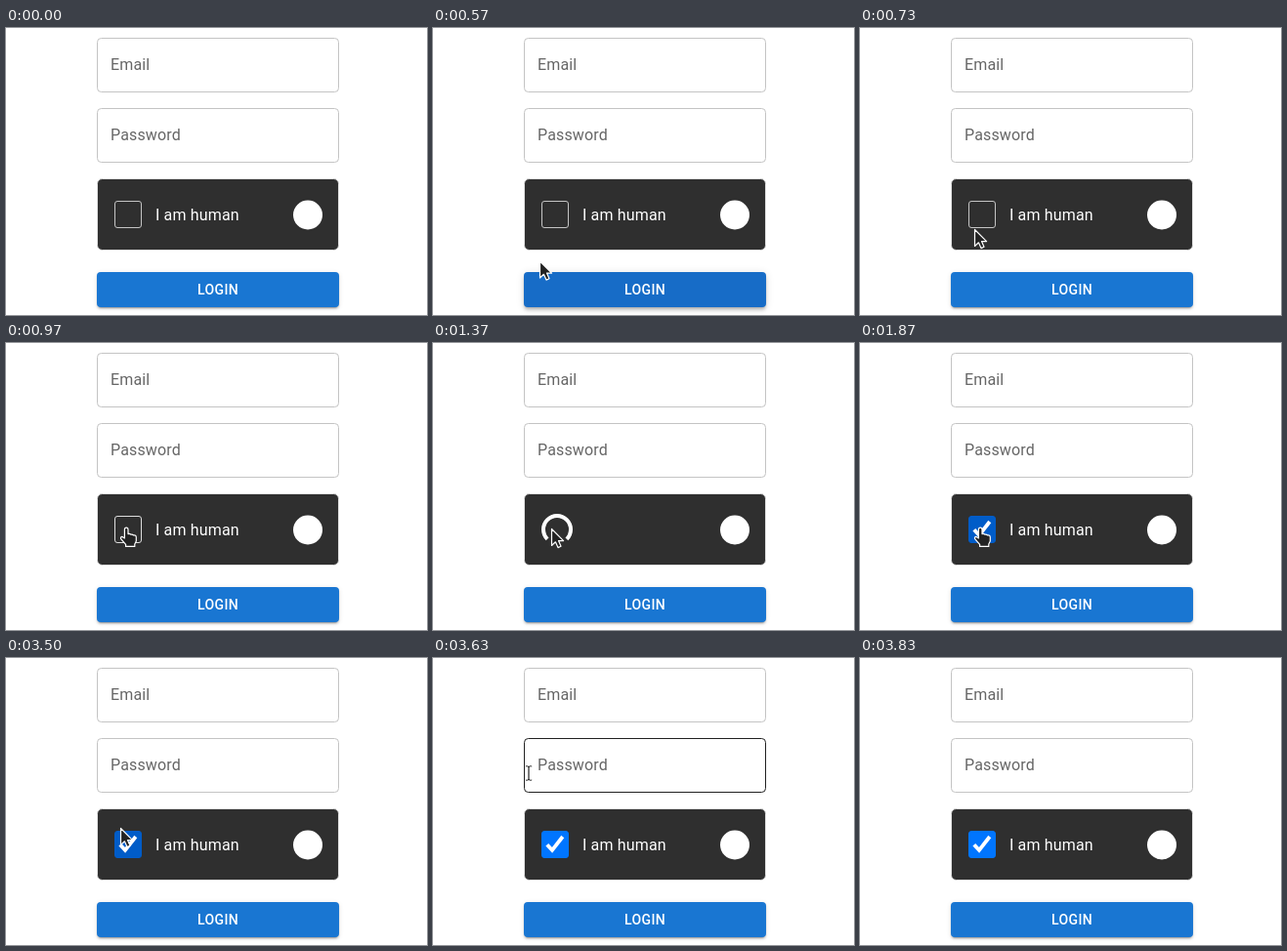
An HTML page that plays this animation: 431x294 px, repeating every 4.03 s.

```html
<!DOCTYPE html>
<html lang="en">
<head>
<meta charset="utf-8">
<title>Login form</title>
<style>
  html, body { margin: 0; width: 100%; height: 100%; overflow: hidden; background: #fff; }
  svg { position: absolute; left: 0; top: 0; display: block; }
  text { font: 16px Roboto, sans-serif; letter-spacing: .15px; }
  .field { fill: none; stroke: #c4c4c4; }
  .label { fill: #666; }
  #login {
    position: absolute; left: 93px; top: 250px; width: 248px; height: 36px;
    border-radius: 4px; color: #fff; text-align: center;
    font: 500 14px/36px Roboto, sans-serif; letter-spacing: .4px;
  }
</style>
</head>
<body>
<div id="login">LOGIN</div>
<svg width="431" height="294" viewBox="0 0 431 294">
  <rect class="field" x="93.5" y="10.5" width="247" height="55" rx="4"/>
  <text class="label" x="107" y="43">Email</text>
  <rect class="field" id="password" x="93.5" y="82.5" width="247" height="55" rx="4"/>
  <text class="label" x="107" y="115">Password</text>

  <rect x="93.5" y="154.5" width="247" height="73" rx="5" fill="#2f2f2f" stroke="#e0e0e0"/>
  <circle cx="309" cy="191.5" r="15" fill="#fff"/>
  <text id="human" x="153" y="197" fill="#fff">I am human</text>
  <rect id="box" x="111.5" y="177.5" width="27" height="27" rx="2.5"/>
  <path id="tick" d="M116.8 191.2L122 196.8L132.8 183" fill="none" stroke="#fff" stroke-width="3.8"/>
  <path id="spinner" d="M117.1 200.9A14 14 0 1 1 136.9 200.9" fill="none" stroke="#fff" stroke-width="4"/>

  <g id="cursor" stroke="#fff" stroke-width="1.2" stroke-linejoin="round" fill="#222">
    <path id="arrow" d="M.5 .5V17.5L4.4 13.8L7 19.6L10 18.3L7.5 12.6H12.6Z"/>
    <path id="hand" d="M.4 1.2Q.4 -.8 2.2 -.8T4 1.2V5.6Q5.6 4.8 6.8 6.2Q8.4 5.6 9.6 7Q12.3 6.6 12.3 9V13L10.8 16V18.4H1.6V16.4L-3.4 10.6Q-4 8.6 -2 8.4L.4 10Z"/>
    <path id="beam" d="M-3.5 -8H-1L0 -7.4L1 -8H3.5V-6.2H1V6.2H3.5V8H1L0 7.4L-1 8H-3.5V6.2H-1V-6.2H-3.5Z" stroke-width=".8"/>
  </g>
</svg>
<script>
  const LOOP = 4030, FPS = 30;
  const $ = id => document.getElementById(id);
  const show = (id, on) => $(id).style.display = on ? '' : 'none';
  const within = (n, from, to) => n >= from && n < to;

  // Keys are [tick, value, ...], joined by straight lines.
  const enter = [[14, 105, 286], [15, 106, 268], [17, 109, 238.5], [22, 117, 206], [24, 121, 190]];
  const leave = [[104, 121, 190], [105, 117, 174], [107, 108, 150], [109, 98, 118], [112, 74, 62], [115, 42, -22]];
  const hover = [[14, 0], [17, .6], [21, 0]];

  function at(keys, n) {
    if (n <= keys[0][0]) return keys[0].slice(1);
    for (let i = 1; i < keys.length; i++) {
      const a = keys[i - 1], b = keys[i];
      if (n <= b[0]) {
        const p = (n - a[0]) / (b[0] - a[0]);
        return a.slice(1).map((v, j) => v + (b[j + 1] - v) * p);
      }
    }
    return keys[keys.length - 1].slice(1);
  }

  function drawButton(h) {
    const mix = (a, b) => a + (b - a) * h;
    const shadow = (y, blur, spread, alpha) =>
      `0 ${y}px ${blur}px ${spread}px rgba(0,0,0,${alpha})`;
    const s = $('login').style;
    s.backgroundColor = `rgb(${mix(25, 21)},${mix(118, 101)},${mix(210, 192)})`;
    s.boxShadow = [
      shadow(mix(3, 2), mix(1, 4), mix(-2, -1), .2),
      shadow(mix(2, 4), mix(2, 5), 0, .14),
      shadow(mix(1, 1), mix(5, 10), 0, .12)
    ].join();
  }

  function drawCheckbox(n) {
    const busy = within(n, 41, 56), checked = n >= 56;
    const over = within(n, 24, 106);
    const blue = over ? '#005cc8' : '#0075ff';
    show('human', !busy);
    show('box', !busy);
    show('tick', checked);
    show('spinner', busy);
    $('box').setAttribute('fill', checked ? blue : 'none');
    $('box').setAttribute('stroke', checked ? blue : over ? '#ddd' : '#c4c4c4');
    $('spinner').setAttribute('transform', `rotate(${(n - 41) * 12} 127 191)`);
  }

  function drawCursor(n) {
    const [x, y] = at(n < 60 ? enter : leave, n);
    const hand = within(n, 29, 41) || within(n, 56, 105);
    const beam = within(n, 108, 110);
    show('cursor', within(n, 14, 115));
    show('hand', hand);
    show('beam', beam);
    show('arrow', !hand && !beam);
    $('cursor').setAttribute('transform', `translate(${x} ${y})`);
  }

  function draw(ms) {
    const n = Math.floor((ms % LOOP + 5) * FPS / 1000);
    drawButton(at(hover, n)[0]);
    drawCheckbox(n);
    drawCursor(n);
    $('password').style.stroke = within(n, 108, 111) ? '#212121' : '';
  }

  const start = performance.now();
  function loop() {
    draw(performance.now() - start);
    requestAnimationFrame(loop);
  }
  loop();
</script>
</body>
</html>
```
